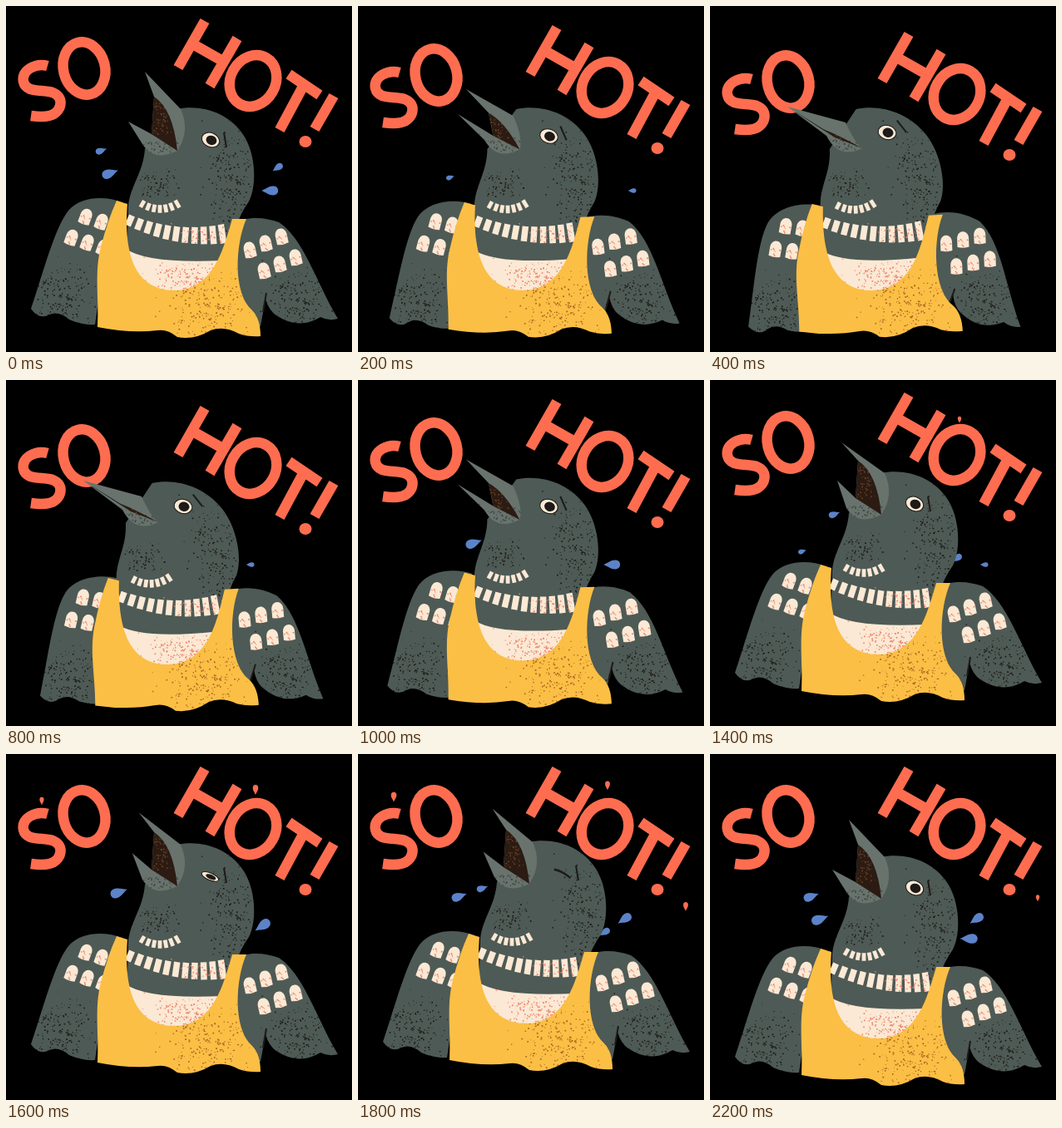
Write an HTML page with a canvas that moves like this. It is 416 px wide and 416 px high and loops after 2.3 s.

```html
<!DOCTYPE html>
<html lang="en">
<head>
<meta charset="utf-8">
<title>So hot!</title>
<style>
  html, body { margin: 0; width: 100%; height: 100%; overflow: hidden; background: #000; }
  canvas { display: block; }
</style>
</head>
<body>
<canvas id="stage" width="416" height="416" role="img" aria-label="SO HOT! A sweating bird in a yellow tank top"></canvas>
<script>
const ctx = document.getElementById('stage').getContext('2d');
const LOOP = 2300, STEP = 100;
const GREY = '#4e5a55', BEAK = '#69736e', CREAM = '#fbe9d5', YELLOW = '#fbbf46', DARK = '#1d1a17',
      CORAL = '#ff6d50', BLUE = '#5c83c9', RUST = '#ee8268', BROWN = '#a9651f';

// Outlines with the head raised; every other pose is a transform of them
const LETTERS = new Path2D('M50 72C36 68 18 77 21 91C24 105 44 100 56 104C72 110 66 129 52 132Q44 134 30 132' +
  'M239 18L207 74M278 39L245 96M225 46L262 67M340 82L377 107M358 95L329 149M394 108L371 148');
const LEFT_WING = new Path2D('M140 236C120 228 90 228 75 246C58 268 45 320 30 364Q40 378 52 371Q64 366 76 377Q92 384 107 383L114 335L140 300Z');
const RIGHT_WING = new Path2D('M270 262C290 252 312 254 328 260C358 280 372 330 399 376Q388 379 378 374Q352 390 325 372Q316 366 312 352L306 385L270 380Z');
const CREASE = new Path2D('M313 345L309 368');
const HEAD = new Path2D('M145 320L147 240C150 215 165 200 167 172L205 124C235 118 268 128 286 156C300 178 302 215 292 235C282 250 278 258 276 275L262 310Z');
const CHEST = new Path2D('M144 292Q170 310 260 306L250 350L150 350Z');
const TANK = new Path2D('M133 234L146 238C142 290 150 343 205 342C250 340 262 290 272 256L289 256C276 285 272 345 296 366Q306 376 306 397Q292 398 280 394Q262 384 246 390Q226 402 206 398Q194 388 182 390Q150 394 110 386C112 350 106 320 114 290Q122 258 133 234Z');
const SPOT = new Path2D('M-7 9L-7 -2C-6 -12 6 -12 7 -2L7 9Q0 11 -7 9Z');
const DROP = new Path2D('M-11 0C-5 -2 -2 -6 4 -5.5C11 -5 11 5 4 5.5C-2 6 -5 2 -11 0Z');

let seed = 7;
const random = () => (seed = seed * 16807 % 2147483647) / 2147483647;
const bell = () => random() + random() + random() - 1.5;
const GRAIN = Array.from({ length: 250 }, () => [bell(), bell(), 0.7 + random() * 1.1]);

const lerp = (a, b, k) => a + (b - a) * k;
const ease = u => u * u * (3 - 2 * u);

function track(t, keys) {
  const next = keys.findIndex(([time]) => time > t);
  if (next < 1) return keys.at(next && -1)[1];
  const [t0, a] = keys[next - 1], [t1, b] = keys[next];
  return lerp(a, b, ease((t - t0) / (t1 - t0)));
}

function fill(path, color) {
  ctx.fillStyle = color;
  ctx.fill(path);
}

function stroke(path, color, width) {
  ctx.strokeStyle = color;
  ctx.lineWidth = width;
  ctx.stroke(path);
}

function speckle(path, color, x, y, rx, ry, count) {
  ctx.save();
  ctx.clip(path);
  ctx.fillStyle = color;
  for (const [gx, gy, size] of GRAIN.slice(0, count)) ctx.fillRect(x + gx * rx, y + gy * ry, size, size);
  ctx.restore();
}

function ellipse(x, y, rx, ry, angle = 0) {
  const path = new Path2D();
  path.ellipse(x, y, rx, ry, angle, 0, 7);
  return path;
}

function polygon(...points) {
  return new Path2D('M' + points.join('L') + 'Z');
}

function moved(matrix, draw) {
  ctx.save();
  ctx.transform(...matrix);
  draw();
  ctx.restore();
}

function turned(x, y, angle, draw) {
  const c = Math.cos(angle), s = Math.sin(angle);
  moved([c, s, -s, c, x, y], draw);
}

function drawLetters(k) {
  moved([1, 0, 0, 1, 0, 16 * k], () => {
    stroke(LETTERS, CORAL, 12.5);
    stroke(ellipse(94, 75, 25, 32, -0.25), CORAL, 12.5);
    stroke(ellipse(297, 90, 27, 32, 0.52), CORAL, 12.5);
    fill(ellipse(360, 163, 7.5, 7), CORAL);
  });
}

function drop(t, color, size, birth, x, y, dx, dy) {
  const age = (t - birth + LOOP) % LOOP, u = age / 700, n = age / STEP;
  if (u >= 1) return;
  const s = size * Math.sqrt(Math.sin(Math.PI * u));
  turned(x + dx * n, y + dy * n, Math.atan2(dy, dx), () => {
    ctx.scale(s, s);
    fill(DROP, color);
  });
}

function drawDrops(t) {
  for (const [birth, row] of [[750, 1], [1300, 0], [1700, 0], [1850, 1]]) {
    drop(t, BLUE, 1.05, birth, 156, 159 + 31 * row, -7, 2.5);
    drop(t, BLUE, 1.05, birth, 291, 218 + 4 * row, 6, 4 * row - 4);
  }
  [[300, 50], [43, 60], [394, 188]].forEach(([x, y], i) => drop(t, CORAL, 0.6, 1300 + 150 * i, x, y, 0, -2.5));
}

// Turns a wing about its shoulder; spots sit in two slanted rows
function drawWing(path, k, side, x, y, spotX, spotY, spotAngle, rise) {
  turned(x - 4 * k, y - side * 7 * k, side * 0.18 * k, () => {
    ctx.translate(-x, -y);
    fill(path, GREY);
    speckle(path, DARK, x + side * 55, y + 87, 34, 36, 200);
    if (side > 0) stroke(CREASE, DARK, 2);
    for (let i = 0; i < 6; i++) {
      const row = i % 2, col = i >> 1;
      turned(spotX + 19 * col + side * 17 * row, spotY + rise * col + 25 * row, spotAngle, () => {
        fill(SPOT, CREAM);
        speckle(SPOT, RUST, 2, 3, 9, 10, 14);
      });
    }
  });
}

// Cream bars hanging along a sagging arc
function bars(count, x, y, x2, y2, sag, width, height, grow) {
  for (let i = 0; i < count; i++) {
    const u = i / (count - 1);
    const slope = Math.atan2(y2 - y + 4 * sag * (1 - 2 * u), x2 - x);
    const h = height + grow * u;
    turned(lerp(x, x2, u), lerp(y, y2, u) + 4 * sag * u * (1 - u), slope, () => {
      ctx.fillStyle = CREAM;
      ctx.fillRect(-width / 2, -h / 2, width, h);
    });
  }
}

function drawBeak(k, close) {
  const at = (x, y, x2, y2) => [lerp(x, x2, k), lerp(y, y2, k)];
  const tip = at(167 - 9 * close, 79 + 8 * close, 93, 121);
  const lowTip = at(147 + 6 * close, 139 - 6 * close, 93, 121);
  const brow = at(210, 124, 163, 140), hinge = at(206, 174, 183, 171), corner = at(175, 154, 150, 158);
  const inner = at(178, 109, 136, 148), lip = at(201, 124, 152, 154), chin = at(164, 166, 140, 156);
  const bend = ([x, y], dx, dy, end) => `${x + dx} ${y + dy} ${end}`;
  const upper = new Path2D(`M${tip}L${brow}Q${bend(brow, 12, 26, hinge)}L${corner}L${inner}Z`);
  const lower = new Path2D(`M${lowTip}L${corner}L${hinge}Q${bend(hinge, -28, 14, chin)}Z`);
  const mouth = new Path2D(`M${inner}Q${lip} ${hinge}L${corner}Z`);
  for (const half of [upper, lower]) {
    fill(half, BEAK);
    speckle(half, '#3f4643', hinge[0] - 22, hinge[1] - 6, 22, 10, 50);
  }
  fill(mouth, '#2b1b12');
  speckle(mouth, '#6b4028', inner[0] + 8, inner[1] + 20, 12, 24, 70);
}

function drawEye(k, lid) {
  const x = lerp(246, 213, k), y = lerp(161, 152, k);
  turned(x, y, 0.4 - 0.15 * k, () => {
    if (lid > 0.8) return stroke(new Path2D('M-11 0Q0 -2 11 2'), DARK, 2.5);
    const white = ellipse(0, lid * 3, 11, 8.5 * (1 - lid));
    fill(white, CREAM);
    stroke(white, DARK, 1);
    fill(ellipse(1, lid * 3, 6.5, 5.6 * (1 - lid)), DARK);
  });
  turned(x + 17, y - lerp(0, 7, k), -0.5 * k, () => stroke(new Path2D('M-1 -9L2 9'), DARK, 2));
}

function drawHead(k) {
  moved([1, 0, 0.13 * k, 1, -45.5 * k, 0], () => {
    fill(HEAD, GREY);
    speckle(HEAD, DARK, 270, 205, 28, 52, 210);
    speckle(HEAD, DARK, 180, 212, 22, 16, 70);
  });
}

function drawTorso(k) {
  moved([1, -0.06 * k, 0.05 * k, 1, -22 * k, 12 * k], () => {
    fill(CHEST, CREAM);
    speckle(CHEST, RUST, 218, 325, 42, 18, 190);
    bars(11, 149, 258, 260, 274, 8, 7.5, 13, 10);
    speckle(HEAD, RUST, 238, 274, 32, 10, 55);
    bars(7, 164, 238, 206, 238, 6, 4.8, 9, 1);
    fill(TANK, YELLOW);
    speckle(TANK, BROWN, 242, 358, 48, 36, 250);
  });
}

function draw(t) {
  const headDown = track(t, [[0, 0], [400, 1], [800, 1], [1200, 0]]);
  const wingsIn = track(t, [[0, 0], [400, 1], [800, 0.7], [1200, 0]]);
  const lift = track(t, [[800, 0], [1200, -9], [1400, -12], [1800, -18], [2200, 0]]);
  const close = track(t, [[1200, 0], [1400, 1], [1800, 0.6], [2200, 0]]);
  const lid = track(t, [[1500, 0], [1700, 1], [1900, 1], [2100, 0]]);

  ctx.fillStyle = '#000';
  ctx.fillRect(0, 0, 416, 416);
  drawLetters(headDown);
  drawDrops(t);
  moved([1, 0, 0, 1, 0, lift], () => {
    drawWing(LEFT_WING, wingsIn, -1, 120, 260, 96, 253, 0.35, 6);
    drawWing(RIGHT_WING, wingsIn, 1, 295, 265, 293, 293, -0.22, -8);
    drawHead(headDown);
    drawTorso(headDown);
    drawBeak(headDown, close);
    drawEye(headDown, lid);
  });
}

function frame() {
  draw(Math.floor(performance.now() % LOOP / STEP) * STEP);
  requestAnimationFrame(frame);
}
frame();
</script>
</body>
</html>
```
